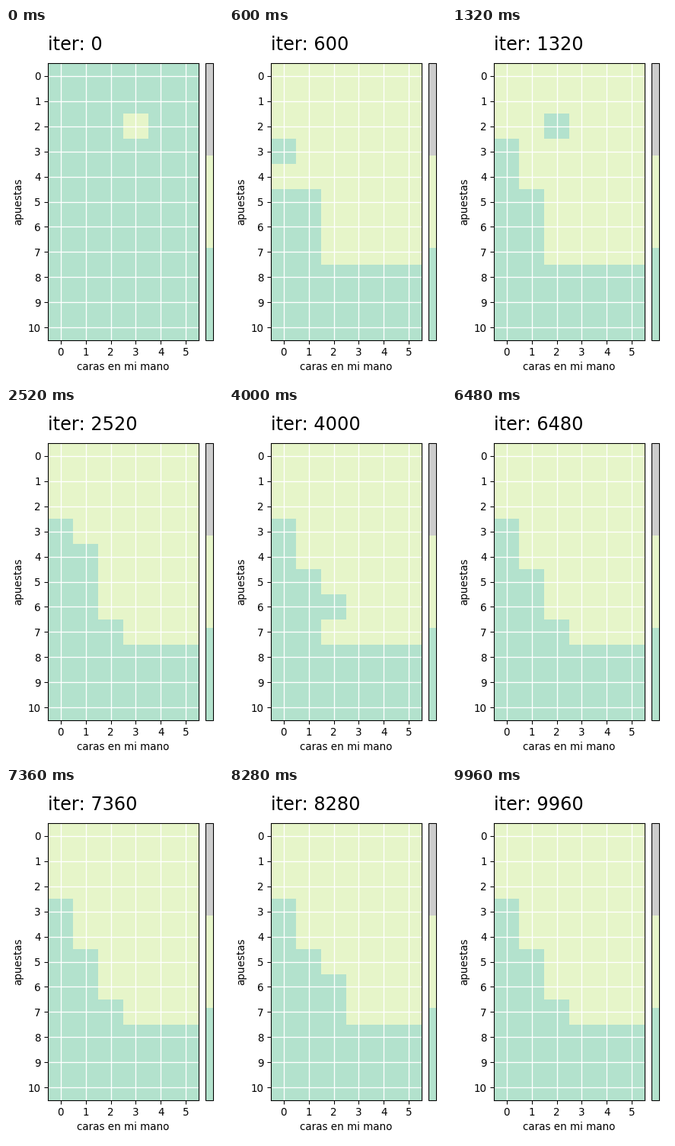
These frames come from a looping animation (285 px wide and 461 px high, 10 s). A matplotlib script:

```python
import numpy as np
import matplotlib.pyplot as plt
from matplotlib.animation import FuncAnimation
from matplotlib.colors import ListedColormap

W, H, DPI = 285, 461, 96
ROWS, COLS = 11, 6
FRAMES, STEP = 250, 40
PALETTE = ListedColormap(["#b3e2cd", "#e6f5c9", "#cccccc"])

plt.rcParams.update({"font.family": "DejaVu Sans", "font.size": 10.15,
                     "text.kerning_factor": 6})

# Settled policy: each column is 1 above a staircase limit, 0 below it.
row, col = np.mgrid[:ROWS, :COLS]
SETTLED = (row < np.minimum(8, 3 + 2 * col)).astype(int)

# Undecided cells flip briefly at regular times:
# (row, col): (first flip, period, end), in ms.
WAVERING = {
    (2, 2): (1240, 1000, 2000),
    (3, 0): (1600, 700, 2900),
    (4, 1): (1540, 900, 8300),
    (6, 2): (1770, 1070, 10000),
    (7, 2): (1240, 1340, 10000),
}
FLIP_TIME = 180

# Learning phase: random first-update frames, plus stray 1s near the limit.
rng = np.random.default_rng(7)
START = 1 + np.minimum(rng.exponential(3.5, (ROWS, COLS)), 22)
START[2, 3] = 0
STRAY_END = np.minimum(START + rng.exponential(4, (ROWS, COLS)), 26)


def policy(frame):
    """Best action in every cell at this frame."""
    learned = frame >= START
    stray = (row < 8) & (frame < STRAY_END)
    grid = np.where(learned & (stray | (SETTLED == 1)), 1, 0)
    now = frame * STEP
    for cell, (first, period, end) in WAVERING.items():
        if first <= now < end and (now - first) % period < FLIP_TIME:
            grid[cell] = 1 - SETTLED[cell]
    return grid


def add_axes(left, top, width, height):
    return fig.add_axes([left / W, 1 - (top + height) / H,
                         width / W, height / H])


fig = plt.figure(figsize=(W / DPI, H / DPI), dpi=DPI, facecolor="white")

ax = add_axes(55.2, 46.2, 197.58, 362.6)
image = ax.imshow(policy(0), cmap=PALETTE, vmin=0, vmax=2,
                  interpolation="nearest", aspect="auto")
ax.set_xticks(range(COLS))
ax.set_yticks(range(ROWS))
ax.grid(color="white", linewidth=1)
ax.set_xlabel("caras en mi mano")
ax.set_ylabel("apuestas")

fig.colorbar(image, cax=add_axes(262.3, 46.2, 9.9, 362.6), ticks=[])
title = fig.text(55 / W, 1 - 29 / H, "iter: 0", fontsize=18)


def update(frame):
    image.set_data(policy(frame))
    title.set_text(f"iter: {frame * STEP}")
    return image, title


anim = FuncAnimation(fig, update, frames=FRAMES, interval=STEP,
                     repeat=True, repeat_delay=0, blit=False)
plt.show()
```
